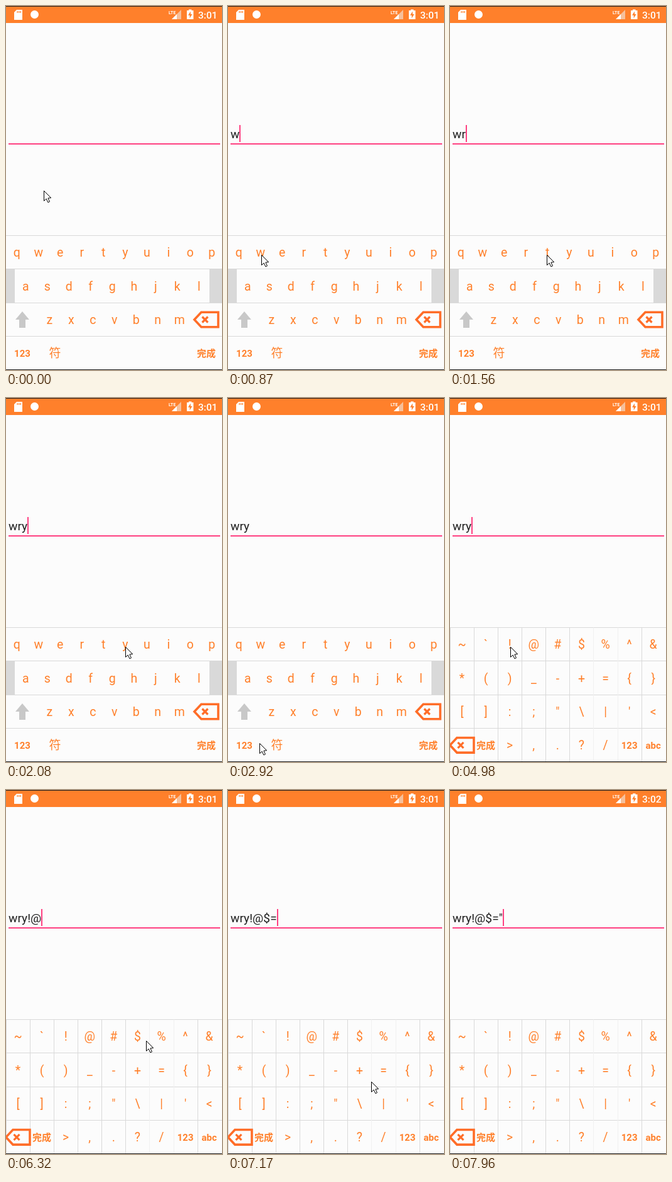
Recreate the animation shown at these times as an HTML page with a canvas. Size 344 by 578 pixels, loop 8000 ms.

```html
<!DOCTYPE html>
<html lang="en">
<head>
<meta charset="utf-8">
<title>Keyboard demo</title>
<style>
html, body { margin: 0; width: 100%; height: 100%; overflow: hidden; background: #fcfcfc; }
canvas { display: block; width: 344px; height: 578px; }
</style>
</head>
<body>
<canvas id="stage"></canvas>
<script>
const W = 344, H = 578, LOOP = 8000;
const canvas = document.getElementById('stage');
const ratio = window.devicePixelRatio || 1;
canvas.width = W * ratio;
canvas.height = H * ratio;
const ctx = canvas.getContext('2d');
ctx.scale(ratio, ratio);

const ORANGE = '#ff802b', DEEP = '#ff6d28', PINK = '#ff4081', PAPER = '#fcfcfc', RULE = '#d9d9d9';
const SANS = 'Roboto, "Noto Sans CJK SC", "Noto Sans CJK", sans-serif';
const TOP = 364.5, ROW = 53.35, KEY = 34.5, CELL = 38.08;

// The screen refreshes once per tick; a press lasts one tick, a pointer move two.
const TICK = 136, PHASE = 60, TRAVEL = 2 * TICK;
const CLOCK = 7840, LEAVE = 7900;
const MODE = '符';

const rowMid = r => TOP + ROW * (r + 0.5);

function keyRow(chars, r, left, w) {
  return [...chars].map((s, i) => ({ s, r, x: left + i * w, w }));
}

const letters = [
  ...keyRow('qwertyuiop', 0, 0, KEY),
  ...keyRow('asdfghjkl', 1, 14, KEY),
  ...keyRow('zxcvbnm', 2, 52, KEY),
  { s: '123', r: 3, x: 0, w: 52, bold: true },
  { s: MODE, r: 3, x: 52, w: 52 },
  { s: '完成', r: 3, x: 293, w: 52, bold: true }
];
const symbols = [
  ...keyRow('~`!@#$%^&', 0, 0, CELL),
  ...keyRow('*()_-+={}', 1, 0, CELL),
  ...keyRow('[]:;"\\|\'<', 2, 0, CELL),
  { s: '完成', r: 3, x: CELL, w: CELL, bold: true },
  ...keyRow('>,.?/', 3, CELL * 2, CELL),
  { s: '123', r: 3, x: CELL * 7, w: CELL, bold: true },
  { s: 'abc', r: 3, x: CELL * 8, w: CELL, bold: true }
];

// A stop is a place the pointer stays at until it leaves
function press(s, at, hold = TICK) {
  const key = [...letters, ...symbols].find(k => k.s === s);
  return { s, at, leave: at + hold, x: key.x + key.w / 2 + 1, y: rowMid(key.r) + 4 };
}
const rest = (x, y, leave) => ({ x, y, at: leave, leave });

const stops = [
  rest(60, 293, 150),
  press('w', 590), press('r', 1290), press('y', 1800),
  rest(176, 406, 2350), rest(50, 548, 3470),
  press(MODE, 4130), press('!', 5225), press('@', 5905),
  rest(223, 398, 6320),
  press('$', 6450), press('=', 7040, 0), press('"', 7400),
  rest(101, 560, LEAVE)
];
const presses = stops.filter(p => p.s);
const switchTime = presses.find(p => p.s === MODE).leave;

function rect(color, x, y, w, h) {
  ctx.fillStyle = color;
  ctx.fillRect(x, y, w, h);
}

function trace(points) {
  ctx.beginPath();
  points.forEach(([x, y]) => ctx.lineTo(x, y));
  ctx.closePath();
}

function fillPoly(color, points) {
  trace(points);
  ctx.fillStyle = color;
  ctx.fill();
}

function text(s, x, y, font, color, align) {
  ctx.font = font + ' ' + SANS;
  ctx.fillStyle = color;
  ctx.textAlign = align;
  ctx.fillText(s, x, y);
}

function drawStatus(t) {
  rect(ORANGE, 0, 1, W, 26);
  fillPoly('#fff', [[17, 6], [26, 6], [26, 22], [13, 22], [13, 10]]);
  for (let i = 0; i < 3; i++) rect(ORANGE, 17.5 + i * 2.6, 8, 1.3, 3);
  ctx.beginPath();
  ctx.arc(45.5, 13.5, 6.5, 0, Math.PI * 2);
  ctx.fillStyle = '#fff';
  ctx.fill();

  fillPoly('#f6c09b', [[279, 6], [279, 21], [264, 21]]);
  fillPoly('#fff', [[272, 13], [272, 21], [264, 21]]);
  text('LTE', 259, 12.5, 'bold 7px', '#fff', 'left');

  rect('#fff', 291, 5.5, 4.5, 2);
  rect('#fff', 288, 7, 10.5, 14);
  fillPoly(ORANGE, [[294, 8.5], [290, 14.8], [292.6, 14.8], [292.6, 19.5], [296.6, 13], [294, 13]]);
  text(t < CLOCK ? '3:01' : '3:02', 336.5, 20, '500 15.5px', '#fff', 'right');
}

function drawField(t) {
  const done = presses.filter(p => p.leave <= t && p.s !== MODE);
  const typed = done.map(p => p.s).join('');
  text(typed, 4, 210, '19.2px', '#1f1f1f', 'left');
  rect(PINK, 4, 218, 337, 2);
  // The caret blinks from the last typed character
  const since = t - (done.length ? done[done.length - 1].leave : -500);
  if (since % 1000 < 500) {
    rect(PINK, 4 + Math.round(ctx.measureText(typed).width), 189, 2, 27);
  }
}

function drawErase(x, y) {
  trace([[x + 1, y], [x + 12, y - 11.8], [x + 39, y - 11.8], [x + 39, y + 11.8], [x + 12, y + 11.8]]);
  ctx.strokeStyle = DEEP;
  ctx.lineWidth = 3.6;
  ctx.stroke();
  ctx.beginPath();
  for (const d of [-4.5, 4.5]) {
    ctx.moveTo(x + 18 - d, y - 4.5);
    ctx.lineTo(x + 18 + d, y + 4.5);
  }
  ctx.lineWidth = 3.2;
  ctx.stroke();
}

function drawKeys(keys, t) {
  const down = presses.find(p => p.at <= t && t < p.leave);
  for (const k of keys) {
    const mid = rowMid(k.r);
    if (down && down.s === k.s) rect('#b9b9b9', k.x, mid - ROW / 2 + 0.5, k.w, ROW - 0.5);
    const font = k.bold ? 'bold 15px' : k.s === MODE ? '300 19px' : '19.5px';
    text(k.s, k.x + k.w / 2, Math.round(mid + (k.bold ? 5.8 : 7)), font, ORANGE, 'center');
  }
}

function drawKeyboard(t) {
  const abc = t < switchTime;
  if (abc) {
    rect(RULE, 0, TOP + ROW, 14, ROW);
    rect(RULE, 324, TOP + ROW, 20, ROW);
  }
  drawKeys(abc ? letters : symbols, t);
  for (let r = 0; r < 4; r++) rect(RULE, 0, Math.round(TOP - 0.5 + r * ROW), W, 1);
  if (abc) {
    fillPoly('#c8c8c8', [[26, 485], [37, 498], [31, 498], [31, 511], [21, 511], [21, 498], [15, 498]]);
    drawErase(299, 498);
  } else {
    for (let c = 0; c < 9; c++) {
      const faint = c === 6 || c === 7;
      rect(faint ? '#f1f1f1' : RULE, Math.round(c * CELL), TOP, 1, H - TOP);
    }
    drawErase(-1, 551.3);
  }
}

function pointerAt(t) {
  const i = stops.findIndex(p => p.leave >= t);
  const to = stops[i], from = stops[i - 1] || to;
  const span = Math.min(TRAVEL, to.at - from.leave) || 1;
  const u = Math.max(0, Math.min(1, (t - from.leave) / span));
  const ease = u * u * (3 - 2 * u);
  const mix = (a, b) => Math.round(a + (b - a) * ease) + 0.5;
  return [mix(from.x, to.x), mix(from.y, to.y)];
}

function drawPointer(t) {
  if (t >= LEAVE) return;
  const [x, y] = pointerAt(t);
  const shape = [[0, 0], [0, 16], [3.7, 12.6], [6.4, 18.4], [9, 17.2], [6.4, 11.6], [11.2, 11.2]];
  fillPoly('#fff', shape.map(([dx, dy]) => [x + dx, y + dy]));
  ctx.strokeStyle = '#000';
  ctx.lineWidth = 1;
  ctx.stroke();
}

function draw(now) {
  const t = Math.max(0, PHASE + TICK * Math.floor((now % LOOP - PHASE) / TICK));
  rect(PAPER, 0, 0, W, H);
  drawStatus(t);
  drawField(t);
  drawKeyboard(t);
  rect('#1c1c1c', 0, 0, W, 1);
  rect('#1c1c1c', 0, H - 1, W, 1);
  drawPointer(t);
}

const start = performance.now();
function loop() {
  draw(performance.now() - start);
  requestAnimationFrame(loop);
}
loop();
</script>
</body>
</html>
```
